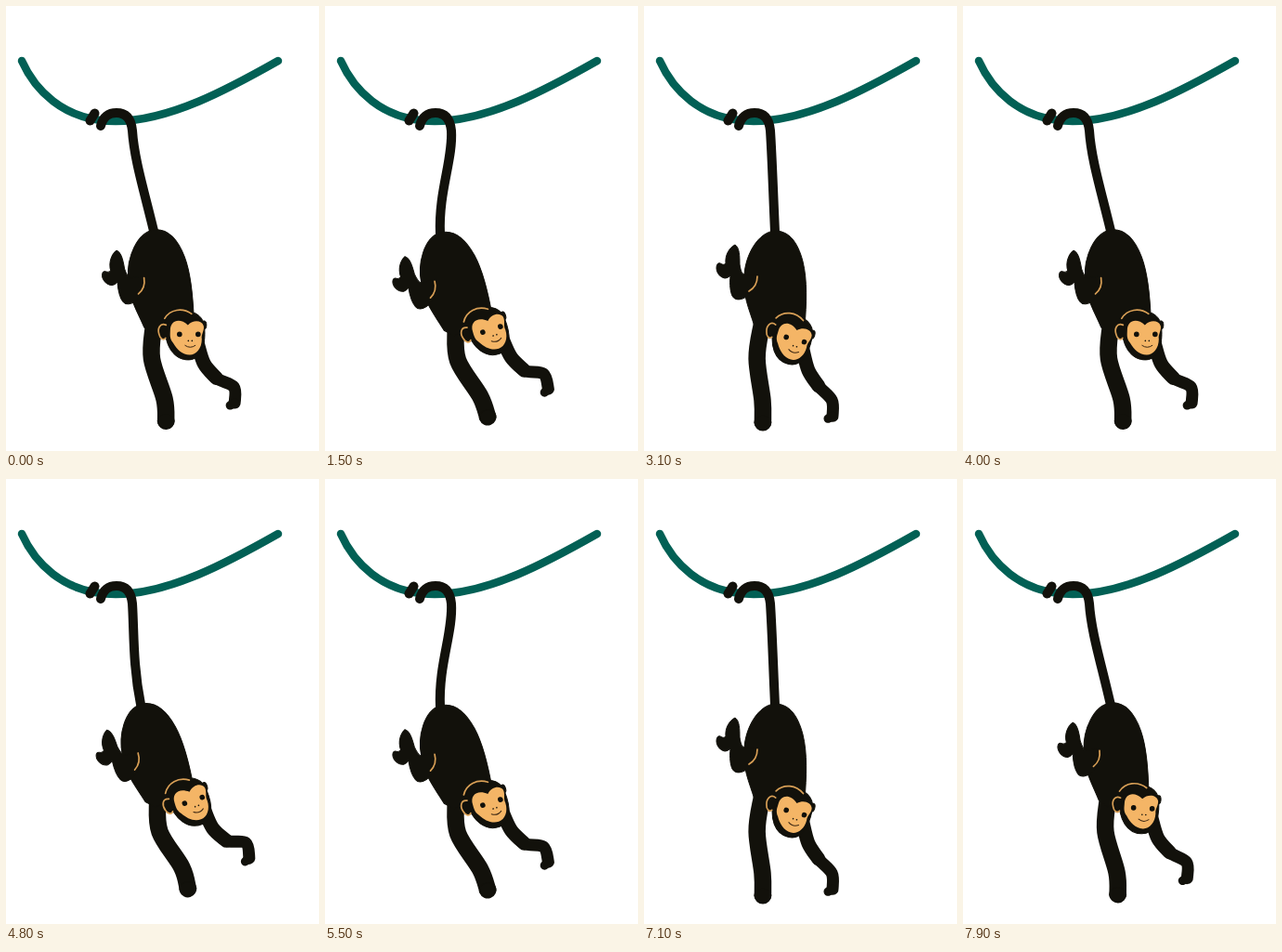
These frames come from a looping animation (337 px wide and 479 px high, 8 s). An HTML page:

```html
<!DOCTYPE html>
<html lang="en">
<head>
<meta charset="utf-8">
<title>Swinging monkey</title>
<style>
  html, body { margin: 0; width: 100%; height: 100%; overflow: hidden; background: #fff; }
  svg { display: block; width: 100%; height: 100%; }
  .fur { fill: #12110b; stroke: #12110b; }
  .limb { fill: none; stroke: #12110b; stroke-linecap: round; stroke-linejoin: round; }
  .line { fill: none; stroke: #d89f56; stroke-width: 1.7; stroke-linecap: round; }
  .face { fill: #f4b566; }
</style>
</head>
<body>
<svg viewBox="0 0 337 479">
  <path d="M17 59C30 88 60 124 118 124C176 124 240 89 293 59" fill="none" stroke="#026055" stroke-width="8.500" stroke-linecap="round"/>
  <path class="limb" stroke-width="10" d="M95.5 115.500L90.500 123.5"/>
  <path id="tail" class="limb" stroke-width="10"/>
  <path id="nearArm" class="limb" stroke-width="18.5"/>
  <ellipse id="nearHand" class="fur" rx="9" ry="7.5"/>
  <path id="farUpper" class="limb" stroke-width="15"/>
  <path id="farArm" class="limb" stroke-width="13"/>
  <path id="farHand" class="limb" stroke-width="9.5"/>

  <!-- torso and leg are drawn around the tail root -->
  <path id="torso" class="fur" d="M0 -1C-18 0 -32 25 -33 47C-35 69 -28 82 -22 102L-13 110L10 107L32 102C34 77 35 52 30 32C24 9 14 -1 0 -1Z"/>
  <g id="leg">
    <path class="fur" d="M-43 14C-49 17 -54 25 -53 34C-57 38 -59 31 -62 35C-65 40 -61 49 -54 50C-51 50 -49 48 -48 47C-49 57 -48 65 -46 69C-43 75 -35 73 -31 70C-23 66 -20 58 -18 46L-33 46C-36 45 -37 41 -38 35C-38 27 -38 17 -43 14Z"/>
    <path class="line" d="M-19 48C-19 53 -21 60 -28 64"/>
  </g>

  <g id="head">
    <path class="fur" d="M-22 -10C-20 -22 -10 -25 0 -25C12 -25 21 -18 21 -6C22 11 18 27 4 27.500C-11 28 -22 14 -22 -10Z"/>
    <ellipse class="fur" cx="20.5" cy="-10" rx="2.500" ry="4.500"/>
    <ellipse class="fur" cx="-23.5" cy="-3" rx="4.500" ry="7.500"/>
    <path class="line" d="M-20.500 -10C-27 -13 -30 -6 -28 0C-27 5 -23 7 -21 4"/>
    <path class="line" d="M-22 -17C-16 -27 -3 -29 7 -22"/>
    <path class="face" d="M-16 -4C-16 -15 -6 -18 3 -10C9 -16 18 -15 20 -9C21 -4 17 0 18 5C18 15 12 22 5 22C-3 22 -9 16 -13 9C-17 4 -16 0 -16 -4Z"/>
    <g fill="#12110b">
      <circle cx="-6" cy="0" r="2.8"/>
      <circle cx="14" cy="0" r="2.8"/>
      <circle cx="3.500" cy="7" r=".8"/>
      <circle cx="7.500" cy="7" r=".8"/>
    </g>
    <path d="M0 12Q5.500 16 11 12" fill="none" stroke="#3a2613" stroke-linecap="round"/>
  </g>
</svg>
<script>
const PERIOD = 4000, STEP = 100, RAD = Math.PI / 180;
const KEYS = [0, 1500, 3100];
const $ = id => document.getElementById(id);
const part = Object.fromEntries(
  ["tail", "nearArm", "nearHand", "farUpper", "farArm", "farHand", "torso", "leg", "head"].map(id => [id, $(id)]));

// Every value swings as mean + sine; three key poses define that sine.
function weights(t) {
  const s = (a, b) => Math.sin((a - b) * Math.PI / PERIOD);
  return KEYS.map((k, i) => KEYS.reduce((w, o, j) => i === j ? w : w * s(t, o) / s(k, o), 1));
}

// Angles grow as the lower end moves to the right.
function turn([x, y], deg) {
  const c = Math.cos(deg * RAD), s = Math.sin(deg * RAD);
  return [x * c + y * s, y * c - x * s];
}
const add = (p, q) => [p[0] + q[0], p[1] + q[1]];

function chain(start, lengths, angles) {
  const pts = [start];
  lengths.forEach((len, i) => pts.push(add(pts[i], turn([0, len], angles[i]))));
  return pts;
}

// Smooth curve through all points
function curve(pts) {
  let d = "M" + pts[0];
  for (let i = 0; i < pts.length - 1; i++) {
    const a = pts[i], b = pts[i + 1], before = pts[i - 1] || a, after = pts[i + 2] || b;
    const c1 = [0, 1].map(k => a[k] + (b[k] - before[k]) / 6);
    const c2 = [0, 1].map(k => b[k] - (after[k] - a[k]) / 6);
    d += `C${c1} ${c2} ${b}`;
  }
  return d;
}

const place = (el, [x, y], deg) => el.setAttribute("transform", `translate(${x} ${y}) rotate(${-deg})`);
const draw = (el, d) => el.setAttribute("d", d);

function render(t) {
  const w = weights(t);
  const mix = (a, b, c) => a * w[0] + b * w[1] + c * w[2];
  const root = [mix(159, 124, 141), mix(242, 245, 243)];
  const lean = mix(8, 17.4, 0);
  const onBody = (x, y) => add(root, turn([x, y], lean));

  draw(part.tail, `M102 129C105 118 111 115 119 115C131 115 135 124 136 134C138 165 ${mix(149, 122, 139)} 200 ${root}`);
  place(part.torso, root, mix(6.5, 14.5, 0));
  place(part.leg, root, mix(10, 15, 0));
  place(part.head, onBody(18, 115), mix(0, 18, -15));

  const near = chain(onBody(-14.5, 102), [35, 45, 24], [mix(-3, 4, -8), mix(17.5, 32, 7.5), mix(4, 20, 1)]);
  draw(part.nearArm, curve([onBody(-10, 88), ...near]));
  place(part.nearHand, near[3], mix(0, 8, 0));

  const wrist = mix(3, 18, 3);
  const far = chain(onBody(30, 127), [23, 20, 21, 17],
    [mix(18, 25, 15), mix(41, 45, 33), mix(63, 80, 43), wrist]);
  draw(part.farUpper, curve(far.slice(0, 3)));
  draw(part.farArm, curve(far));
  draw(part.farHand, `M${far[4]}L${add(far[4], turn([-5, 2.5], wrist))}`);
}

const start = performance.now();
function tick() {
  const t = Math.max(0, performance.now() - start);
  render(Math.floor(t / STEP) * STEP % PERIOD);
  requestAnimationFrame(tick);
}
tick();
</script>
</body>
</html>
```
